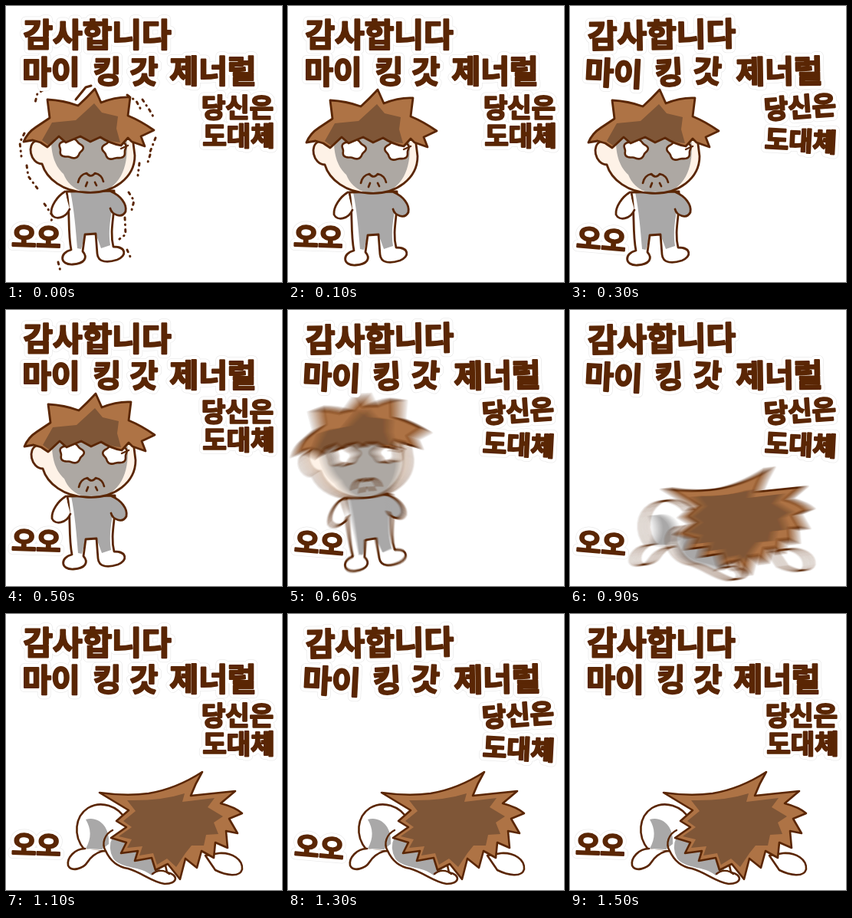
Animation of 360 by 360 pixels, one loop 1.6 s. Source, as an HTML page with a canvas:

```html
<!DOCTYPE html>
<html lang="ko">
<head>
<meta charset="utf-8">
<style>
html, body { margin: 0; width: 100%; height: 100%; overflow: hidden; background: #fff; }
canvas { display: block; width: 360px; height: 360px; }
</style>
</head>
<body>
<canvas id="stage" width="360" height="360"></canvas>
<script>
const SIZE = 360, STEP = 100, STEPS = 16;
const INK = '#5a2604', HAIR = '#ae7345', HAIR_DARK = '#7f5637', GREY = '#a9a8a8', FACE_GREY = '#ada8a3', SKIN = '#fef2e7';
const stage = document.getElementById('stage').getContext('2d');
const layerCanvas = document.createElement('canvas');
layerCanvas.width = layerCanvas.height = SIZE;
const layer = layerCanvas.getContext('2d');

function shape(g, d, fill, line = 0) {
  const path = new Path2D(d);
  if (fill) { g.fillStyle = fill; g.fill(path); }
  if (line) { g.strokeStyle = INK; g.lineWidth = line; g.stroke(path); }
}

function oval(g, x, y, rx, ry, turn, fill, line = 0) {
  const path = new Path2D();
  path.ellipse(x, y, rx, ry, turn, 0, Math.PI * 2);
  shape(g, path, fill, line);
}

function cloudEye(g, x, y, rx, ry, bumps, phase) {
  const path = new Path2D();
  for (let i = 0; i < 72; i++) {
    const a = i / 72 * Math.PI * 2;
    const r = 1 + 0.09 * Math.cos(a * bumps + phase);
    path.lineTo(x + rx * r * Math.cos(a), y + ry * r * Math.sin(a));
  }
  path.closePath();
  shape(g, path, '#fff', 2.6);
}

function shiverMarks(g) {
  g.save();
  g.setLineDash([3, 6, .5, 6]);
  shape(g, 'M48 110 L41 114 L38 126 M24 166 L18 178 L20 196 M27 208 L29 222 L41 238 M50 258 L61 274 L56 290 L62 302' +
    ' M158 116 L170 124 L177 137 M178 122 L188 137 L193 146 M195 172 L188 190 M188 194 L184 207 M174 205 L172 221' +
    ' M160 243 L167 254 L163 270 M155 276 L156 298 L148 304 M158 318 L162 327 M68 334 L71 346', null, 3);
  g.setLineDash([]);
  shape(g, 'M91 122 L104 106 L111 104', null, 3);
  g.restore();
}

const HAIR_TOP = 'M24 178 Q29 166 40 159 L58 147 L55 123 Q76 124 95 131 Q106 121 117 109 L125 127' +
  ' Q145 119 163 120 L160 144 Q177 151 194 163 L177 171 L182 184 L165 178 L160 173 L151 183' +
  ' Q136 180 124 172 L111 178 L98 171 L79 179 L70 171 L55 185 L46 179 L36 176 Z';

function standing(g) {
  const body = 'M80 243 C85 265 81 293 86 319 C70 323 71 339 88 338 C104 337 108 329 101 321' +
    ' L104 299 L118 298 L120 324 C121 336 134 336 146 332 C159 327 158 315 141 315 C135 291 145 268 142 242 Z';
  shape(g, body, '#fff');
  shape(g, 'M85 243 L142 243 C141 268 133 285 137 313 L125 317 L118 298 L104 299 L99 318 L94 317 C92 292 90 268 85 243', GREY);
  shape(g, body, null, 2.8);
  shape(g, 'M78 243 C68 249 59 262 60 272 C64 281 79 278 84 266', '#fff', 2.8);
  shape(g, 'M138 243 C150 248 159 259 157 269 C152 279 139 273 137 265', GREY, 2.8);

  const head = 'M40 177 C28 181 32 206 48 207 C54 227 76 243 104 244 C142 247 169 224 169 196 L166 172 L60 160 Z';
  shape(g, head, SKIN);
  shape(g, 'M60 170 L158 172 C161 199 157 231 127 244 L104 244 C88 240 80 230 76 220 C66 211 59 196 60 170', FACE_GREY);
  shape(g, head, null, 2.8);
  shape(g, 'M95 231 Q97 221 106 219 Q112 226 117 219 Q126 221 128 230 M107 231 L105 236 M117 231 L119 235', null, 2.7);
  cloudEye(g, 85.5, 187, 15, 12, 5, .5);
  cloudEye(g, 142.5, 188, 15, 12.5, 5, 2.4);
  shape(g, 'M151 187 L160 183', null, 2.4);

  shape(g, HAIR_TOP, HAIR);
  shape(g, 'M48 176 L61 153 L92 150 L116 128 L126 140 L147 145 L145 161 L150 179 Q136 178 124 172' +
    ' L111 177 L98 171 L79 178 L70 171 L56 182 Z', HAIR_DARK);
  shape(g, HAIR_TOP, null, 2.8);
}

function shivering(g) {
  g.save();
  g.translate(-1, -1);
  standing(g);
  g.restore();
  shiverMarks(g);
}

function toppling(g) {
  shape(g, 'M176 225 C172 255 150 280 120 289 C98 291 77 297 80 305 C90 312 110 308 130 305' +
    ' C108 311 87 321 91 330 C125 337 165 329 190 313 C215 299 232 285 238 265 Z', '#fff', 2.6);
  shape(g, 'M181 230 C178 262 155 285 128 294 L119 300 L150 299 L118 321 C150 324 180 311 198 294 C214 279 222 265 224 248 Z', GREY);
  shape(g, 'M174 220 C160 218 156 233 164 241 L177 244', '#fff', 2.6);
  shape(g, 'M168 148 C172 185 174 215 186 240 C205 268 228 281 242 275 C266 254 282 225 278 185 L255 140 L200 132 Z', SKIN, 2.6);
  shape(g, 'M182 150 C181 190 185 222 199 244 C214 261 229 248 237 222 C245 195 244 165 240 144 Z', FACE_GREY);
  oval(g, 203, 181, 10, 19, -.1, '#fff', 2.4);
  oval(g, 252, 192, 8, 24, .15, '#fff', 2.4);
  oval(g, 214, 241, 7, 19, .55, '#ee8273', 2);
  shape(g, 'M158 153 L163 113 L179 126 L193 107 L211 124 L225 107 L251 133 L284 155 L301 200 L288 233' +
    ' L272 187 L249 153 L239 169 L218 145 L204 161 L188 143 L174 160 Z', HAIR, 2);
  shape(g, 'M180 136 L192 121 L209 138 L225 121 L252 145 L281 179 L286 211 L271 178 L247 148 L237 160 L217 142 L203 153 Z', HAIR_DARK);
}

const LYING_HAIR = 'M122 233 Q157 238 186 234 Q222 228 256 206 Q247 221 241 237 L299 231 L280 247' +
  ' Q299 252 308 260 L291 267 L302 286 L287 283 L289 305 L273 298 L271 318 L255 309 L249 331' +
  ' L234 319 L227 346 L211 326 L195 334 L190 318 L168 322 L172 309 L150 312 L157 298 L137 292' +
  ' L157 278 L144 270 L160 256 Z';

function lying(g) {
  shape(g, 'M278 312 C295 311 309 320 308 333 C305 344 287 341 273 334 L260 315 Z', '#fff', 2.6);
  shape(g, 'M102 307 C87 289 90 264 107 253 C124 243 146 250 156 268 L202 302 L210 337' +
    ' C225 340 225 352 207 352 C191 350 177 337 159 332 C146 330 136 322 130 309 Q116 310 102 307', '#fff', 2.6);
  shape(g, 'M104 268 C121 263 136 278 134 300 L125 307 L104 306 C112 292 111 280 104 268', GREY);
  shape(g, 'M139 291 L196 309 L201 334 L190 341 C175 328 151 333 140 319 Q132 305 139 291', GREY);
  shape(g, 'M103 306 C90 306 79 318 81 328 C85 337 101 332 106 324 Q113 313 126 309', '#fff', 2.6);
  shape(g, 'M130 309 C124 299 129 287 139 282 M191 339 C198 333 207 334 213 339', null, 2.4);
  shape(g, LYING_HAIR, HAIR);
  shape(g, 'M158 243 Q202 244 233 234 L230 245 L272 240 L263 252 L283 264 L271 272 L277 287' +
    ' L261 288 L258 302 L242 302 L234 312 L222 330 L210 319 L197 327 L192 312 L174 315 L178 303' +
    ' L158 305 L164 294 L147 290 L164 278 L153 270 L169 257 Z', HAIR_DARK);
  shape(g, LYING_HAIR, null, 2.6);
}

// Averages copies of a pose spread over u = -1..1 for motion blur.
function smear(pose, move, copies = 21) {
  for (let i = 0; i < copies; i++) {
    layer.fillStyle = '#fff';
    layer.fillRect(0, 0, SIZE, SIZE);
    layer.save();
    move(layer, i / (copies - 1) * 2 - 1);
    pose(layer);
    layer.restore();
    stage.globalAlpha = 1 / (i + 1);
    stage.drawImage(layerCanvas, 0, 0);
  }
  stage.globalAlpha = 1;
}

function turnAbout(g, x, y, degrees) {
  g.translate(x, y);
  g.rotate(degrees * Math.PI / 180);
  g.translate(-x, -y);
}

function drawFigure(step) {
  if (step < 6) (step % 2 ? standing : shivering)(stage);
  else if (step === 6) smear(standing, (g, u) => turnAbout(g, 115, 335, -5 + 3 * u));
  else if (step === 7) smear(toppling, (g, u) => {
    turnAbout(g, 100, 318, 2.5 * u);
    g.translate(-4 * u, 5 * u);
  });
  else if (step === 8) smear(lying, (g, u) => {
    g.translate(2 * u, -1 + 12 * u);
    turnAbout(g, 115, 335, 2 * u);
  });
  else if (step === 9) smear(lying, (g, u) => g.translate(4 + 8 * u, -u));
  else if (step === 10) smear(lying, (g, u) => g.translate(1 + 3 * u, 0));
  else lying(stage);
}

// text, size, then centre x, centre y and tilt for the calm and the wobbly state
const WORDS = [
  ['감사합니다', 42, [119, 38, 0], [119.5, 38, -1]],
  ['마이', 41, [59, 86, 0], [57, 88, 3]],
  ['킹', 40, [132, 86, 0], [129, 87, -3]],
  ['갓', 40, [180, 86, 0], [179.5, 85, 3]],
  ['제너럴', 41, [270, 85.5, 0], [273, 85.5, -1]],
  ['당신은', 34, [302, 132.5, 0], [300, 132, -4]],
  ['도대체', 34, [303.5, 170, 0], [301, 176, 3]],
  ['오오', 35, [39.5, 302, 2], [41, 305, 5]]
];

function drawWords(wobbly) {
  const passes = [['#ebebeb', 12], ['#fff', 10.5], [INK, 2.2]];
  for (const [color, width] of passes) {
    for (const [text, size, calm, wild] of WORDS) {
      const [x, y, tilt] = wobbly ? wild : calm;
      stage.save();
      stage.translate(x, y);
      stage.rotate(tilt * Math.PI / 180);
      stage.font = `900 ${size}px "Noto Sans CJK KR", "Noto Sans CJK", sans-serif`;
      stage.textAlign = 'center';
      stage.strokeStyle = stage.fillStyle = color;
      stage.lineWidth = width;
      stage.strokeText(text, 0, size * .36);
      stage.fillText(text, 0, size * .36);
      stage.restore();
    }
  }
}

function isWobbly(step) {
  // The wobble swaps every two steps, with one step skipped as the fall begins.
  const beat = step < 7 ? step : step + 1;
  return beat % 4 > 1;
}

function render(now) {
  const step = Math.floor(now / STEP) % STEPS;
  stage.fillStyle = '#fff';
  stage.fillRect(0, 0, SIZE, SIZE);
  drawFigure(step);
  drawWords(isWobbly(step));
}

for (const g of [stage, layer]) g.lineJoin = g.lineCap = 'round';
const start = performance.now();
function tick() {
  render(performance.now() - start);
  requestAnimationFrame(tick);
}
tick();
</script>
</body>
</html>
```
